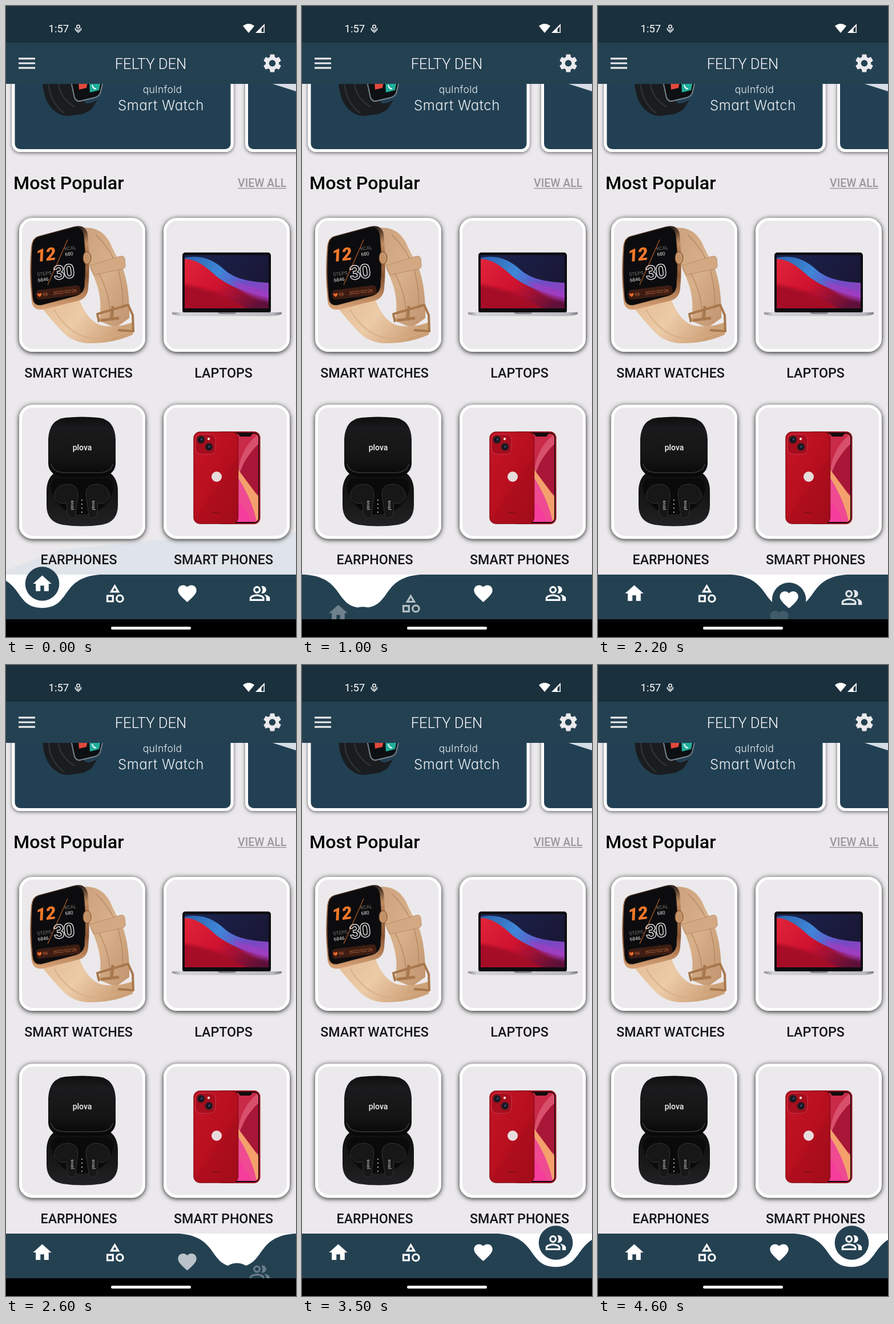
These frames come from a looping animation (508 by 1102 pixels, 4.7 s). An HTML page:

```html
<!DOCTYPE html>
<html lang="en">
<head>
<meta charset="utf-8">
<title>Shop home screen</title>
<style>
  html, body { margin: 0; width: 100%; height: 100%; overflow: hidden; background: #ebe9ec; }
  svg { display: block; width: 100%; height: 100%; font-family: Roboto, sans-serif; }
  .label { font-size: 23.2px; font-weight: 500; fill: #151417; text-anchor: middle; }
  .promo { font-family: Inter, sans-serif; font-weight: 300; font-feature-settings: "cv11"; fill: #edf0f3; text-anchor: middle; }
  .card { fill: #ebe9ec; stroke: #fff; stroke-width: 5; filter: url(#shadow); }
</style>
</head>
<body>
<svg viewBox="0 0 508 1102" preserveAspectRatio="none">
  <defs>
    <filter id="shadow" x="-10%" y="-10%" width="120%" height="120%">
      <feDropShadow dx="0" dy="1.5" stdDeviation="4.5" flood-color="#000" flood-opacity=".9"/>
    </filter>
    <filter id="lift" x="-10%" y="-10%" width="120%" height="120%">
      <feDropShadow dx="0" dy="1.5" stdDeviation="3" flood-color="#000" flood-opacity=".6"/>
    </filter>
    <filter id="soft"><feGaussianBlur stdDeviation="2.5"/></filter>
    <linearGradient id="strap" x2="1" y2="1">
      <stop stop-color="#c9a07b"/><stop offset=".5" stop-color="#d8b08a"/><stop offset="1" stop-color="#c0946e"/>
    </linearGradient>
    <linearGradient id="band" x2="1" y2=".4">
      <stop stop-color="#e3bd96"/><stop offset=".5" stop-color="#eccba8"/><stop offset="1" stop-color="#cda178"/>
    </linearGradient>
    <linearGradient id="gold" x2="0" y2="1">
      <stop stop-color="#2a1e18"/><stop offset=".2" stop-color="#c08a60"/><stop offset=".6" stop-color="#8a5634"/><stop offset="1" stop-color="#d9a477"/>
    </linearGradient>
    <linearGradient id="sky" x2=".9" y2=".4">
      <stop stop-color="#1a2450"/><stop offset="1" stop-color="#1a1838"/>
    </linearGradient>
    <linearGradient id="wave" x2="1" y2=".3">
      <stop stop-color="#2a5fa8"/><stop offset=".45" stop-color="#3f86d8"/><stop offset=".75" stop-color="#6a50c8"/><stop offset="1" stop-color="#8a44c0"/>
    </linearGradient>
    <linearGradient id="lava" x2="1" y2=".6">
      <stop stop-color="#e2263a"/><stop offset=".5" stop-color="#cf1230"/><stop offset="1" stop-color="#5c1038"/>
    </linearGradient>
    <linearGradient id="metal" x2="1">
      <stop stop-color="#8c8c94"/><stop offset=".08" stop-color="#d4d3d9"/><stop offset=".92" stop-color="#b9b8bf"/><stop offset="1" stop-color="#77777f"/>
    </linearGradient>
    <linearGradient id="lid" x2="0" y2="1">
      <stop stop-color="#0e0e0f"/><stop offset=".2" stop-color="#1b1b1d"/><stop offset=".7" stop-color="#141415"/><stop offset="1" stop-color="#070708"/>
    </linearGradient>
    <linearGradient id="tray" x2="0" y2="1">
      <stop stop-color="#0f0f10"/><stop offset=".6" stop-color="#19191a"/><stop offset="1" stop-color="#222224"/>
    </linearGradient>
    <linearGradient id="red" x2="1" y2="1">
      <stop stop-color="#c51526"/><stop offset=".5" stop-color="#b80f1f"/><stop offset="1" stop-color="#a50d1b"/>
    </linearGradient>
    <clipPath id="below"><rect y="136" width="508" height="160"/></clipPath>
    <clipPath id="lcd"><rect x="313" y="435" width="147" height="93"/></clipPath>
    <clipPath id="oled"><rect x="372" y="747" width="70" height="154" rx="7"/></clipPath>
  </defs>

  <rect width="508" height="1102" fill="#ebe9ec"/>
  <path id="tint" d="M0 985L95 950L250 934L508 920V995H0Z" fill="#dfe4ea"/>

  <!-- promo carousel -->
  <g clip-path="url(#below)">
    <g fill="#244152" stroke="#fff" stroke-width="5" filter="url(#lift)">
      <rect x="13" y="60" width="383" height="192.500" rx="12"/>
      <rect x="421.500" y="60" width="383" height="192.500" rx="12"/>
    </g>
    <path d="M64 132H122L120 152L138 168Q143 174 160 164L150 180Q138 190 122 190Q106 195 92 188Q66 174 64 132Z" fill="#1a1d20"/>
    <path d="M74 132Q76 168 102 187M92 136Q94 160 120 176" fill="none" stroke="#33373a" stroke-width="2"/>
    <path d="M114 132H170L165 152Q163 158 155 160L130 166Q123 167 120 160Z" fill="#0d1013" stroke="#78838c" stroke-width="2"/>
    <path d="M127 132H143L141 143L128 146Z" fill="#e4483c"/>
    <path d="M146 132H166L163 147L147 151Z" fill="#1fae9b"/>
    <path d="M151 138q1 6 7 7" fill="none" stroke="#fff" stroke-width="2"/>
    <path d="M467 136H508V149Z" fill="#d6dce5"/>
    <text class="promo" x="274" y="151.500" font-size="17.500" letter-spacing=".3">quInfold</text>
    <text class="promo" x="271.500" y="182" font-size="24" letter-spacing=".6">Smart Watch</text>
  </g>

  <!-- header -->
  <rect width="508" height="65" fill="#1b303d"/>
  <rect y="64" width="508" height="72" fill="#244152"/>
  <g fill="#fff">
    <text x="74.500" y="46" font-size="18.500">1:57</text>
    <path d="M415 35Q425 27 435 35L425 47Z"/>
    <path d="M437 47L453 31V47Z"/>
    <path d="M447.500 40L451.500 35.500V45.500H447.500Z" fill="#1b303d"/>
    <g fill="none" stroke="#fff" stroke-width="1.500">
      <circle cx="126.500" cy="36" r="2.800"/>
      <path d="M122 38.500Q120.500 40.500 122.500 42.500L126.500 46L130.500 42.500Q132.500 40.500 131 38.500M124 41L126.500 43L129 41"/>
    </g>
  </g>
  <path d="M22 91.900H51M22 100H51M22 108.100H51" stroke="#ebe9ec" stroke-width="3.230"/>
  <text x="253.500" y="110" font-size="25.600" font-weight="300" fill="#fff" text-anchor="middle">FELTY DEN</text>
  <path transform="translate(447.100 80.600) scale(1.617)" fill="#ebe9ec" d="M19.140 12.940c.04-.3.06-.61.06-.94 0-.32-.02-.64-.07-.94l2.030-1.580c.18-.14.23-.41.12-.61l-1.920-3.320c-.12-.22-.37-.29-.59-.22l-2.390.96c-.5-.38-1.030-.7-1.620-.94l-.36-2.540c-.04-.24-.24-.41-.48-.41h-3.840c-.24 0-.43.17-.47.41l-.36 2.540c-.59.24-1.130.57-1.620.94l-2.390-.96c-.22-.08-.47 0-.59.22L2.740 8.870c-.12.21-.08.47.12.61l2.030 1.580c-.05.3-.09.63-.09.94s.02.64.07.94l-2.030 1.580c-.18.14-.23.41-.12.61l1.920 3.320c.12.22.37.29.59.22l2.390-.96c.5.38 1.030.7 1.620.94l.36 2.540c.05.24.24.41.48.41h3.840c.24 0 .44-.17.47-.41l.36-2.540c.59-.24 1.130-.56 1.620-.94l2.390.96c.22.08.47 0 .59-.22l1.920-3.320c.12-.22.07-.47-.12-.61zM12 15.600A3.600 3.600 0 1 1 12 8.400a3.600 3.600 0 0 1 0 7.200z"/>

  <text x="13" y="320" font-size="32.200" font-weight="500">Most Popular</text>
  <text x="406" y="316" font-size="19.500" font-weight="500" fill="#99979b">VIEW ALL</text>
  <path d="M406 318.500H491" stroke="#99979b" stroke-width="1.600"/>

  <rect class="card" x="25.500" y="372.500" width="216" height="229" rx="21"/>
  <rect class="card" x="278.500" y="372.500" width="216" height="229" rx="21"/>
  <rect class="card" x="25.500" y="699" width="216" height="229" rx="21"/>
  <rect class="card" x="278.500" y="699" width="216" height="229" rx="21"/>
  <text class="label" x="127" y="649">SMART WATCHES</text>
  <text class="label" x="381" y="649">LAPTOPS</text>
  <text class="label" x="127.500" y="975">EARPHONES</text>
  <text class="label" x="381" y="975">SMART PHONES</text>

  <!-- watch -->
  <path d="M130 388C158 384 176 396 186 422L206 462Q217 496 216 545L192 562L163 550Q172 505 148 460L138 420Z" fill="url(#strap)"/>
  <path d="M160 462Q184 505 182 545M158 400Q182 425 190 445M196 458Q207 500 204 530" fill="none" stroke="#b58a64" stroke-width="1.500"/>
  <path d="M147 453L201 437Q207 436 208 442L209 453Q209 458 204 459L154 470Z" fill="#d3a983" stroke="#b88d68"/>
  <path d="M62 526L128 512Q142 548 164 557Q190 564 224 552L222 574Q186 590 142 589Q118 587 102 572Q82 552 62 526Z" fill="url(#band)"/>
  <path d="M84 530Q110 574 148 580Q182 582 216 568" fill="none" stroke="#d5ac84" stroke-width="1.500"/>
  <g fill="none" stroke="#a8774c" stroke-linejoin="round">
    <path d="M163 552L160 538L214 522L222 540L223 568L196 566" stroke-width="4"/>
    <path d="M187 524L185 549M166 549L198 545" stroke-width="5"/>
  </g>
  <path d="M56 402L120 385Q139 381 143 398Q148 450 144 494Q142 510 129 514L66 530Q47 533 45 515Q40 464 44 419Q46 405 56 402Z" fill="url(#gold)"/>
  <path d="M57 403L117 387Q133 383 136 399Q141 446 137 491Q135 502 123 506L62 522Q48 524 47 509Q43 464 46 420Q47 406 57 403Z" fill="#0c0c0e" stroke="#241a15"/>
  <ellipse cx="142" cy="440" rx="7" ry="11" fill="#c49268" stroke="#77492c"/>
  <path d="M73 487L108 408" stroke="#a8582b" stroke-width="1.300"/>
  <g transform="rotate(-7 70 440)">
    <text x="53" y="445" font-size="31" font-weight="900" font-style="italic" fill="#f2782a">12</text>
    <text x="80" y="480" font-size="34" font-weight="700" fill="none" stroke="#e9e9eb" stroke-width="1.400" letter-spacing="-2">30</text>
    <g font-size="8.500" fill="#e6e4e3">
      <text x="51" y="470" fill="#77736f">STEPS</text><text x="51" y="480">6846</text>
      <text x="104" y="431" fill="#77736f">KCAL</text><text x="104" y="441">680</text>
    </g>
    <rect x="45" y="494" width="78" height="17" rx="6" fill="#3d1d13"/>
    <g font-size="7.800" fill="#c26a3c"><text x="57" y="505.500">86</text><text x="75" y="505.500">2022/02/26</text></g>
    <path d="M51 506.500l-3.500-3.500q-1-3 1.500-3.500l2 1.500l2-1.500q2.500.5 1.500 3.500z" fill="#f0682c"/>
  </g>

  <!-- laptop -->
  <rect x="309" y="430.500" width="155" height="106" rx="5" fill="#0c0c0f"/>
  <g clip-path="url(#lcd)">
    <rect x="313" y="435" width="147" height="93" fill="url(#sky)"/>
    <path d="M305 442C338 432 362 442 382 460S428 482 470 484V540H305Z" fill="url(#wave)"/>
    <path d="M305 442C330 440 346 452 364 468S412 500 470 512V540H305Z" fill="url(#lava)"/>
    <path d="M395 482Q430 486 470 506V518Q420 510 395 482Z" fill="#a83ac0" opacity=".7" filter="url(#soft)"/>
    <path d="M305 486Q350 492 380 506T430 535H305Z" fill="#a50b26" filter="url(#soft)"/>
  </g>
  <path d="M291 535H483V538Q475 541.500 460 541.500H314Q298 541.500 291 538Z" fill="url(#metal)"/>
  <path d="M371 535H403Q402 538 398 538H376Q372 538 371 535Z" fill="#85858c"/>

  <!-- earphones -->
  <path d="M71 848Q71 826 84 816H183Q196 826 196 848V872Q196 901 168 906Q134 911 99 906Q71 901 71 872Z" fill="url(#tray)"/>
  <path d="M79 840Q79 825 94 825H172Q188 825 188 840Q186 866 160 882Q132 894 106 882Q81 866 79 840Z" fill="#0a0a0b"/>
  <path d="M74 756Q76 722 104 719Q133 716 162 719Q190 722 192 756V800Q190 820 166 822H100Q76 820 74 800Z" fill="url(#lid)"/>
  <path d="M79 800Q82 814 102 815H164Q184 814 187 800" fill="none" stroke="#37373a" stroke-width="1.500"/>
  <text x="133.500" y="776" font-size="14" font-weight="500" fill="#f2f2f2" text-anchor="middle">plova</text>
  <g fill="#171718" stroke="#343437">
    <path d="M84 856Q86 836 108 835Q127 836 126 854L122 888Q120 896 113 894Q107 892 107 882L106 868Q90 872 84 856Z"/>
    <path d="M182 856Q180 836 158 835Q139 836 140 854L145 888Q147 896 154 894Q160 892 160 882L161 868Q176 872 182 856Z"/>
  </g>
  <g font-size="7" fill="#dcdcdc" text-anchor="middle">
    <text transform="translate(118 872) rotate(-90)">plova</text>
    <text transform="translate(155 872) rotate(-90)">plova</text>
  </g>
  <path d="M133 863V887" stroke="#e6e6e6" stroke-width="2" stroke-linecap="round" stroke-dasharray="0 7"/>

  <!-- phone -->
  <rect x="368.500" y="744" width="76" height="160" rx="10" fill="#140b0d" stroke="#9d1222" stroke-width="2"/>
  <g clip-path="url(#oled)">
    <rect x="372" y="747" width="70" height="154" fill="#c92a48"/>
    <path d="M442 747Q405 778 406 828L442 860Z" fill="#d8506c"/>
    <path d="M442 765Q414 792 406 828L442 854Z" fill="#a81638"/>
    <path d="M404 806L442 857V905H404Z" fill="#f4a06c"/>
    <path d="M404 820Q432 862 440 905H404Z" fill="#ef4a92"/>
    <path d="M404 860Q424 880 430 905H404Z" fill="#f53d9c"/>
  </g>
  <path d="M405 745H431V748Q430 752 425 752H410Z" fill="#140b0d"/>
  <rect x="329" y="744" width="77.500" height="160" rx="11" fill="url(#red)" stroke="#8d0e1a" stroke-width="1.500"/>
  <path d="M331 893L406 786V892Q405 903 395 903H340Q333 902 331 893Z" fill="#8e0a17" opacity=".16"/>
  <rect x="332" y="748" width="35" height="35" rx="10" fill="#a80e1d" stroke="#c9394a"/>
  <g fill="#15171d" stroke="#5b1a24" stroke-width="2">
    <circle cx="341.500" cy="757.500" r="6.500"/><circle cx="355.500" cy="770" r="6.500"/>
  </g>
  <circle cx="342.500" cy="757" r="2" fill="#34476c"/><circle cx="356" cy="769.500" r="2" fill="#34476c"/>
  <circle cx="355" cy="756" r="2.200" fill="#f0d9cf"/>
  <circle cx="369" cy="822" r="9" fill="#e8dcdd"/>
  <path d="M362 885H374" stroke="#7b0d18" stroke-width="1.500"/>

  <!-- navigation -->
  <rect y="993" width="508" height="79" fill="#fff"/>
  <g id="button"><circle r="29.800" fill="#244152"/><path id="glyph" fill="#fff" transform="scale(1.617) translate(-12 -12)"/></g>
  <path id="bar" fill="#244152"/>
  <g id="items" fill="#fff"></g>
  <rect y="1071" width="508" height="31"/>
  <rect x="184" y="1084" width="140" height="5" rx="2.500" fill="#fff"/>
</svg>
<script>
const LOOP = 4700, STEP = 100, W = 508, SLOT = W / 4, DP = W / 392.7;
const TOP = 993, DEPTH = 75 * DP, REST_Y = 1026, BUTTON_Y = 1009;
const icons = [
  'M10 20v-6h4v6h5v-8h3L12 3 2 12h3v8z',
  'M12 2l-5.5 9h11L12 2zm0 3.84L13.93 9h-3.87L12 5.84zM17.5 13a4.5 4.5 0 1 0 0 9a4.5 4.5 0 0 0 0-9zm0 7a2.5 2.5 0 1 1 0-5a2.5 2.5 0 0 1 0 5zM3 21.5h8v-8H3v8zm2-6h4v4H5v-4z',
  'M12 21.35l-1.45-1.32C5.4 15.36 2 12.28 2 8.5 2 5.42 4.42 3 7.5 3c1.74 0 3.41.81 4.5 2.09C13.09 3.81 14.76 3 16.5 3 19.58 3 22 5.42 22 8.5c0 3.78-3.4 6.86-8.55 11.54L12 21.35z',
  'M16.67 13.13C18.04 14.06 19 15.32 19 17v3h4v-3c0-2.18-3.57-3.47-6.33-3.87zM15 12a4 4 0 0 0 0-8c-.47 0-.91.1-1.33.24C14.5 5.27 15 6.58 15 8s-.5 2.73-1.33 3.76c.42.14.86.24 1.33.24zM9 12a4 4 0 1 0 0-8a4 4 0 0 0 0 8zm0-6a2 2 0 1 1 0 4a2 2 0 0 1 0-4zm0 7c-2.67 0-8 1.34-8 4v3h16v-3c0-2.66-5.33-4-8-4zm6 5H3v-.99C3.2 16.29 6.3 15 9 15s5.8 1.29 6 2v1z'
];
// each tap slides the notch one slot to the right
const taps = [{ at: 867, dur: 600 }, { at: 1499, dur: 600 }, { at: 2120, dur: 960 }];

const $ = id => document.getElementById(id);
const items = icons.map(d => {
  const p = document.createElementNS('http://www.w3.org/2000/svg', 'path');
  p.setAttribute('d', d);
  return $('items').appendChild(p);
});

// cubic-bezier(0, 0, .58, 1)
function easeOut(x) {
  if (x <= 0 || x >= 1) return x <= 0 ? 0 : 1;
  let lo = 0, hi = 1;
  for (let i = 0; i < 24; i++) {
    const s = (lo + hi) / 2;
    if (1.74 * s * s * (1 - s) + s ** 3 < x) lo = s; else hi = s;
  }
  return lo * lo * (3 - 2 * lo);
}

function notch(cx) {
  const px = f => cx + f * W, py = f => TOP + f * DEPTH;
  return `M-200 ${TOP}H${px(-.2)}C${px(-.06)} ${py(.05)} ${px(-.1)} ${py(.6)} ${cx} ${py(.6)}` +
    `C${px(.1)} ${py(.6)} ${px(.06)} ${py(.05)} ${px(.2)} ${TOP}H800V1072H-200Z`;
}

function draw(t) {
  const pos = taps.reduce((sum, k) => sum + easeOut((t - k.at) / k.dur), 0);
  const part = pos % 1, cx = (pos + .5) * SLOT;
  const hide = 1 - Math.abs(1 - 2 * part);
  $('bar').setAttribute('d', notch(cx));
  $('button').setAttribute('transform', `translate(${cx} ${BUTTON_Y + hide * 80 * DP})`);
  $('glyph').setAttribute('d', icons[Math.round(pos)]);
  items.forEach((el, i) => {
    const away = Math.min(1, Math.abs(pos - i));
    const y = REST_Y + (1 - away) * 40 * DP;
    el.setAttribute('transform', `translate(${(i + .5) * SLOT} ${y}) scale(1.617) translate(-12 -12)`);
    el.setAttribute('opacity', away);
  });
  $('tint').setAttribute('opacity', Math.max(0, 1 - t / 300));
}

const start = performance.now();
function tick() {
  const t = Math.max(0, performance.now() - start) % LOOP;
  draw(Math.floor(t / STEP) * STEP);
  requestAnimationFrame(tick);
}
tick();
</script>
</body>
</html>
```
